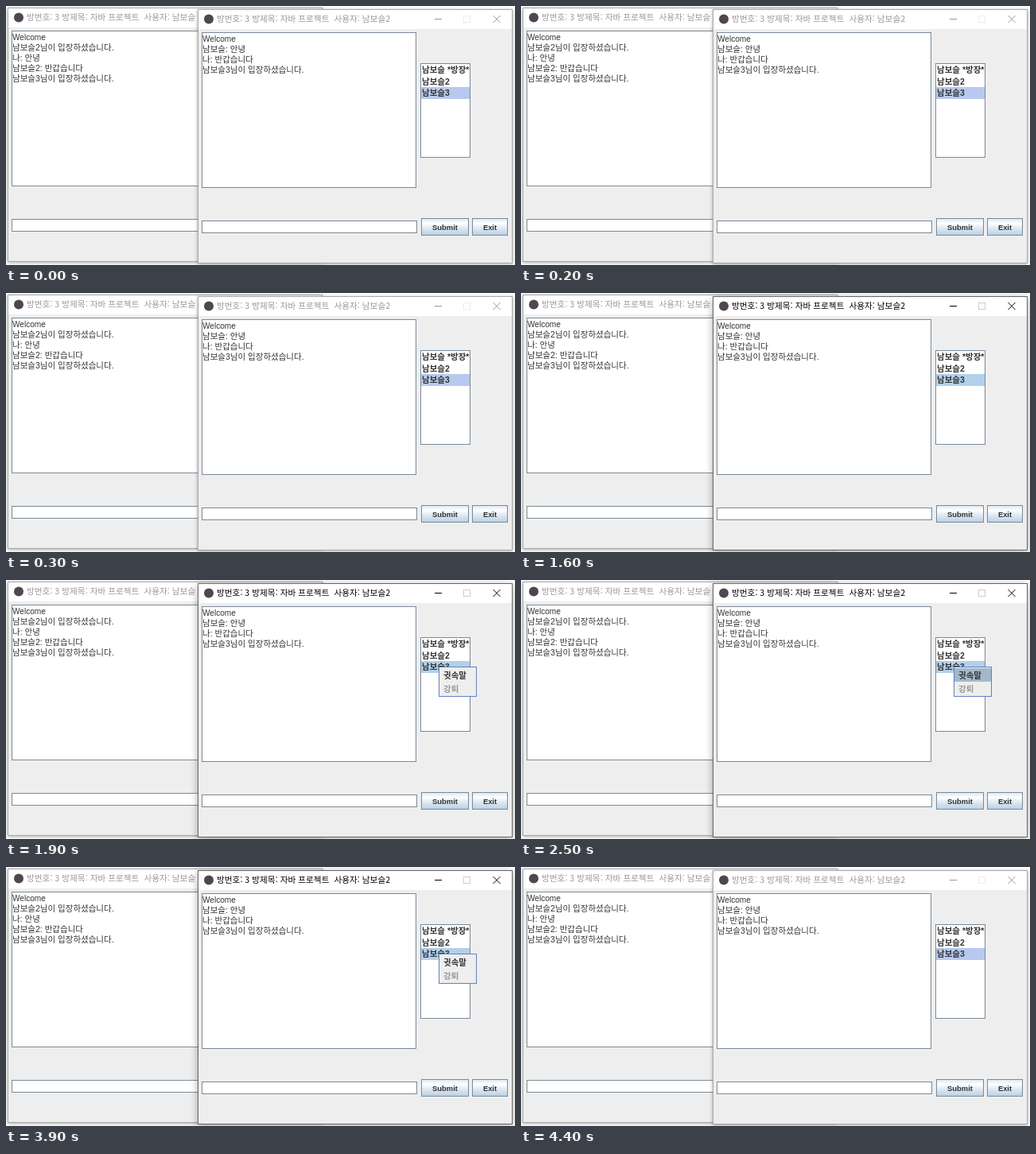
An HTML page that plays this animation: 640x326 px, repeating every 4.5 s.

```html
<!DOCTYPE html>
<html lang="ko">
<head>
<meta charset="utf-8">
<style>
html, body { margin: 0; width: 100%; height: 100%; overflow: hidden; background: #fff; }
svg { display: block; width: 640px; height: 326px; }
text { font: 10.5px "Liberation Sans", "Noto Sans CJK KR", "Noto Sans CJK", sans-serif; fill: #333; white-space: pre; }
.title { font: 10.66px "Noto Sans CJK KR", "Noto Sans CJK", sans-serif; }
.latin { font-size: 10.1px; }
.bold { font-weight: bold; }
.button { font-size: 9.4px; font-weight: bold; text-anchor: middle; }
rect, .glyph { shape-rendering: crispEdges; }
</style>
</head>
<body>
<svg id="stage" viewBox="0 0 640 326">
  <defs>
    <linearGradient id="metal" x2="0" y2="1">
      <stop offset="0" stop-color="#dde8f3"/>
      <stop offset=".3" stop-color="#fff"/>
      <stop offset=".5" stop-color="#e6eef6"/>
      <stop offset="1" stop-color="#b8cfe5"/>
    </linearGradient>
    <filter id="near" x="-10%" y="-10%" width="120%" height="120%">
      <feDropShadow dx="0" dy="1" stdDeviation="2" flood-color="#000" flood-opacity=".35"/>
    </filter>
    <filter id="far" x="-10%" y="-10%" width="120%" height="120%">
      <feDropShadow dx="0" dy="2" stdDeviation="5" flood-color="#000" flood-opacity=".35"/>
    </filter>
  </defs>
</svg>
<script>
const LOOP = 4500;
const STEPS = [
  { at: 0, active: false, menu: false, hover: false },
  { at: 1600, active: true, menu: false, hover: false },
  { at: 1900, active: true, menu: true, hover: false },
  { at: 2500, active: true, menu: true, hover: true },
  { at: 3900, active: true, menu: true, hover: false },
  { at: 4400, active: false, menu: false, hover: false }
];
const NAME = "남보슬";
const EDGE = "#7a8a99";
const stage = document.getElementById("stage");

function add(parent, tag, attrs, text) {
  const el = document.createElementNS("http://www.w3.org/2000/svg", tag);
  for (const key in attrs) el.setAttribute(key, attrs[key]);
  if (text) el.textContent = text;
  parent.appendChild(el);
  return el;
}
const fill = (p, x, y, width, height, color) =>
  add(p, "rect", { x, y, width, height, fill: color });
const box = (p, x, y, width, height, color, stroke = EDGE) =>
  add(p, "rect", { x: x + .5, y: y + .5, width, height, fill: color, stroke });
const label = (p, x, y, text, cls = "") => add(p, "text", { x, y, class: cls }, text);

function makeWindow(x, y, user, lines) {
  const g = add(stage, "g", { transform: `translate(${x} ${y})` });
  const shade = add(g, "rect", { width: 396, height: 320, fill: "#eee", filter: "url(#near)" });
  const frame = box(g, 0, 0, 395, 319, "#eee", "#aaa");
  fill(g, 1, 1, 394, 24, "#fff");
  add(g, "circle", { cx: 14, cy: 12.5, r: 6, fill: "#4f4650" });
  const title = label(g, 24, 16.3, `방번호: 3 방제목: 자바 프로젝트  사용자: ${user}`, "title");
  title.style.fill = "#999";
  box(g, 5, 29, 269, 195, "#fff");
  lines.forEach((s, i) => label(g, 6, 41 + i * 13, s, i ? "" : "latin"));
  box(g, 5, 266, 270, 15, "#fff");
  return { g, shade, frame, title };
}

function button(p, x, width, text) {
  box(p, x, 263, width, 21, "url(#metal)");
  label(p, x + width / 2 + .5, 277.5, text, "button");
}

const joined = n => `${NAME}${n}님이 입장하셨습니다.`;

makeWindow(2, 2, NAME, ["Welcome", joined(2), "나: 안녕", `${NAME}2: 반갑습니다`, joined(3)]);
const { g, shade, frame, title } = makeWindow(241, 4, NAME + "2",
  ["Welcome", `${NAME}: 안녕`, "나: 반갑습니다", joined(3)]);

const minimize = add(g, "path", { d: "M298 12.5h9", class: "glyph" });
const maximize = add(g, "path", { d: "M334.5 8.5h8v8h-8z", class: "glyph" });
const close = add(g, "path", { d: "M371.5 8l9 9m0-9l-9 9" });
for (const el of [minimize, maximize, close]) el.setAttribute("fill", "none");

box(g, 280, 68, 62, 118, "#fff");
const selection = fill(g, 281, 98, 61, 15, "#b8cfe5");
[`${NAME} *방장*`, NAME + "2", NAME + "3"].forEach((s, i) =>
  label(g, 282, 80 + i * 14.7, s, "bold"));
button(g, 281, 59, "Submit");
button(g, 345, 44, "Exit");

const menu = add(g, "g", {});
box(menu, 303, 105, 47, 37, "#eee", "#6382bf");
const hover = fill(menu, 304, 107, 46, 17, "#a3b8cc");
label(menu, 309, 119.5, "귓속말", "bold");
label(menu, 309, 136.5, "강퇴", "bold").style.fill = "#999";

const show = (el, on) => el.setAttribute("visibility", on ? "visible" : "hidden");

function draw(time) {
  const step = STEPS.filter(s => s.at <= time % LOOP).pop();
  const on = step.active;
  title.style.fill = on ? "#000" : "#999";
  shade.setAttribute("filter", on ? "url(#far)" : "url(#near)");
  frame.setAttribute("stroke", on ? "#666" : "#aaa");
  minimize.setAttribute("stroke", on ? "#000" : "#999");
  close.setAttribute("stroke", on ? "#000" : "#999");
  maximize.setAttribute("stroke", on ? "#ccc" : "#ececec");
  selection.setAttribute("fill", on ? "#b3d0ea" : "#b7c9ee");
  show(menu, step.menu);
  show(hover, step.hover);
}

const start = performance.now();
function tick() {
  draw(performance.now() - start);
  requestAnimationFrame(tick);
}
tick();
</script>
</body>
</html>
```
